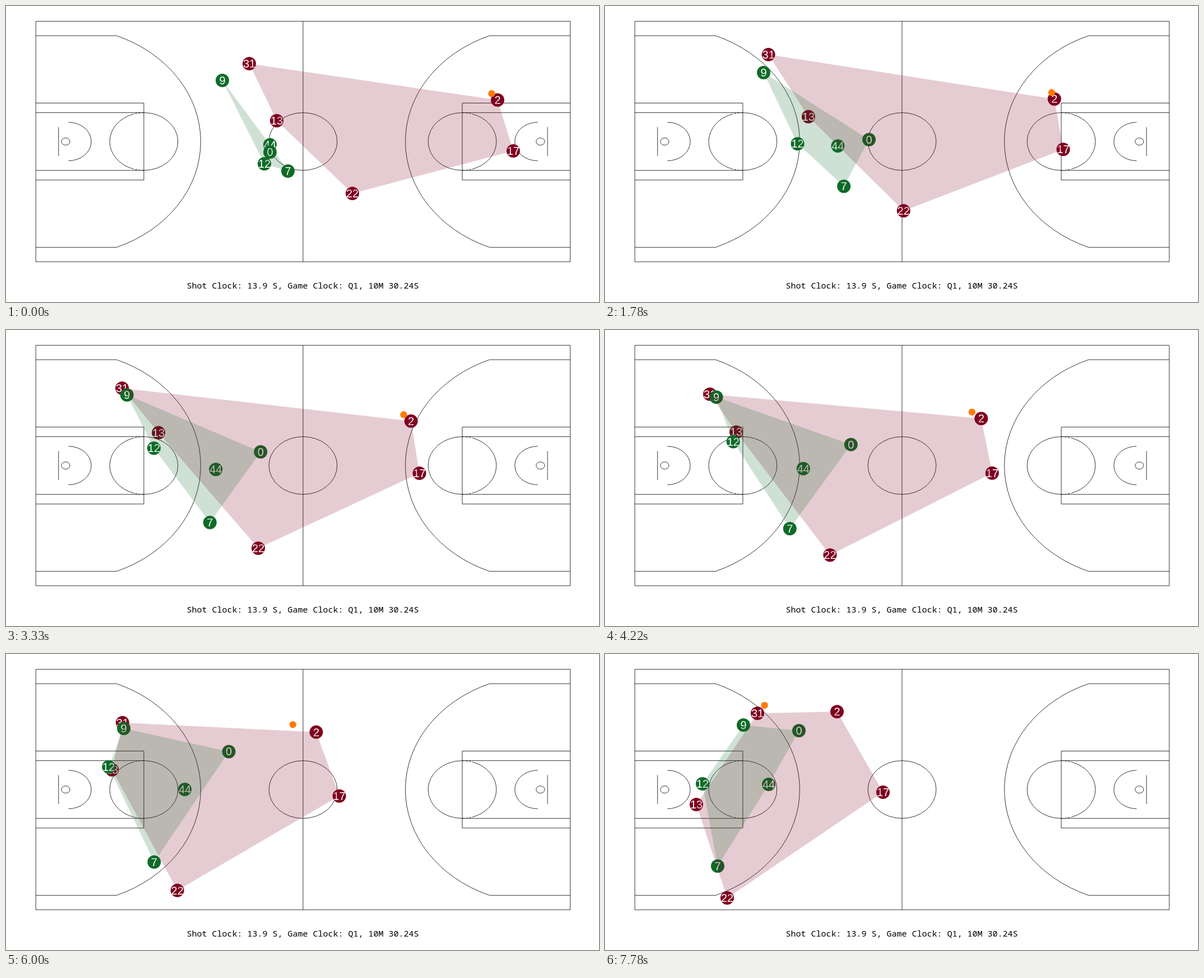
An HTML page for the animation above (8 s loop, 1058x529 px).

```html
<!DOCTYPE html>
<html lang="en">
<head>
<meta charset="utf-8">
<title>Court tracking</title>
<style>
html, body { margin: 0; width: 100%; height: 100%; overflow: hidden; background: #fff; }
svg { display: block; width: 100%; height: 100%; }
#court path { fill: none; stroke: #000; stroke-width: .8; vector-effect: non-scaling-stroke; }
#players { font: 20px "Liberation Sans", Arial, sans-serif; fill: #fff; text-anchor: middle; }
#caption { font: 15px "Noto Sans Mono", monospace; text-anchor: middle; }
</style>
</head>
<body>
<svg viewBox="0 0 1058 529">
  <!-- Court drawn in feet: 94 x 50 -->
  <g id="court" transform="translate(53.2 27.3) scale(10.144 8.596)">
    <path d="M0 0H94V50H0ZM47 0V50M41 25a6 6 0 1 0 12 0a6 6 0 1 0 -12 0"/>
    <g id="half">
      <path d="M0 3H14.2A23.75 23.75 0 0 1 14.2 47H0"/>
      <path d="M0 17H19V33H0M0 19H19M0 31H19"/>
      <path d="M19 19a6 6 0 0 1 0 12M17.25 19.26a6 6 0 0 0 0 11.48"/>
      <path d="M19 19a6 6 0 0 0 -1.75 .26M19 31a6 6 0 0 1 -1.75 -.26" stroke-dasharray="4 2"/>
      <path d="M4 22V28M4.5 25a.75 .75 0 1 0 1.5 0a.75 .75 0 1 0 -1.5 0M5.75 21a4 4 0 0 1 0 8"/>
    </g>
    <use href="#half" transform="translate(94) scale(-1 1)"/>
  </g>
  <g id="players"></g>
  <circle id="ball" r="6.2" fill="#ff7b08"/>
  <g id="hulls" fill-opacity=".2"></g>
  <text id="caption" x="529.6" y="505">Shot Clock: 13.9 S, Game Clock: Q1, 10M 30.24S</text>
</svg>
<script>
const LOOP = 8000, STEPS = 36, RELEASE = 24;
const $ = id => document.getElementById(id);

function add(parent, tag, attrs, text = '') {
  const el = document.createElementNS('http://www.w3.org/2000/svg', tag);
  for (const key in attrs) el.setAttribute(key, attrs[key]);
  el.textContent = text;
  return parent.appendChild(el);
}

// Polynomial path through key points evenly spaced over the loop
function pathThrough(points) {
  return step => {
    const u = step / (STEPS - 1) * (points.length - 1);
    const sum = [0, 0];
    points.forEach((point, i) => {
      const weight = points.reduce((w, _, j) => j === i ? w : w * (u - j) / (i - j), 1);
      sum[0] += weight * point[0];
      sum[1] += weight * point[1];
    });
    return sum;
  };
}

function makeTeam(color) {
  return { color, members: [], hull: add($('hulls'), 'polygon', { fill: color }) };
}

function player(team, number, ...points) {
  const el = add($('players'), 'g', {});
  add(el, 'circle', { r: 12, fill: team.color });
  add(el, 'text', { y: 7 }, number);
  const member = { el, at: pathThrough(points) };
  team.members.push(member);
  return member;
}

function convexHull(points) {
  const sorted = [...points].sort((a, b) => a[0] - b[0] || a[1] - b[1]);
  const chain = list => {
    const out = [];
    for (const p of list) {
      while (out.length > 1) {
        const [a, b] = out.slice(-2);
        if ((b[0] - a[0]) * (p[1] - a[1]) > (b[1] - a[1]) * (p[0] - a[0])) break;
        out.pop();
      }
      out.push(p);
    }
    return out.slice(0, -1);
  };
  return [...chain(sorted), ...chain(sorted.reverse())];
}

const red = makeTeam('#7f0020'), green = makeTeam('#0f6b28');

player(red, 31, [434, 103], [280, 88], [192, 111], [203, 123], [272, 106]);
const carrier = player(red, 2, [877, 168], [762, 165], [610, 150], [414, 103]);
player(red, 17, [905, 259], [776, 256], [639, 255], [496, 247]);
player(red, 13, [483, 205], [352, 196], [247, 182], [192, 203], [163, 269]);
player(red, 22, [618, 335], [490, 379], [349, 414], [218, 436]);
player(green, 44, [471, 248], [393, 250], [334, 245], [292, 233]);
player(green, 0, [471, 261], [464, 228], [418, 189], [346, 137]);
player(green, 12, [461, 282], [334, 242], [241, 203], [186, 200], [174, 232]);
player(green, 7, [503, 295], [393, 334], [294, 365], [201, 379]);
player(green, 9, [386, 133], [274, 118], [203, 118], [207, 132], [247, 127]);

// Dribbled beside the carrier, then passed in a straight line
function ballAt(step) {
  if (step >= RELEASE) {
    const flight = step - RELEASE;
    return [597 - 28.4 * flight, 139 - 4.3 * flight];
  }
  const [x, y] = carrier.at(step);
  return [x - 10.5 + 6 * Math.sin(step * .24), y - 11.5];
}

const place = (el, [x, y]) => el.setAttribute('transform', `translate(${x.toFixed(2)} ${y.toFixed(2)})`);

function draw() {
  const time = performance.now() % LOOP;
  const step = Math.floor((time + 5) * STEPS / LOOP) % STEPS;
  for (const team of [red, green]) {
    const points = team.members.map(m => m.at(step));
    team.members.forEach((m, i) => place(m.el, points[i]));
    team.hull.setAttribute('points', convexHull(points).join(' '));
  }
  place($('ball'), ballAt(step));
  requestAnimationFrame(draw);
}
draw();
</script>
</body>
</html>
```
